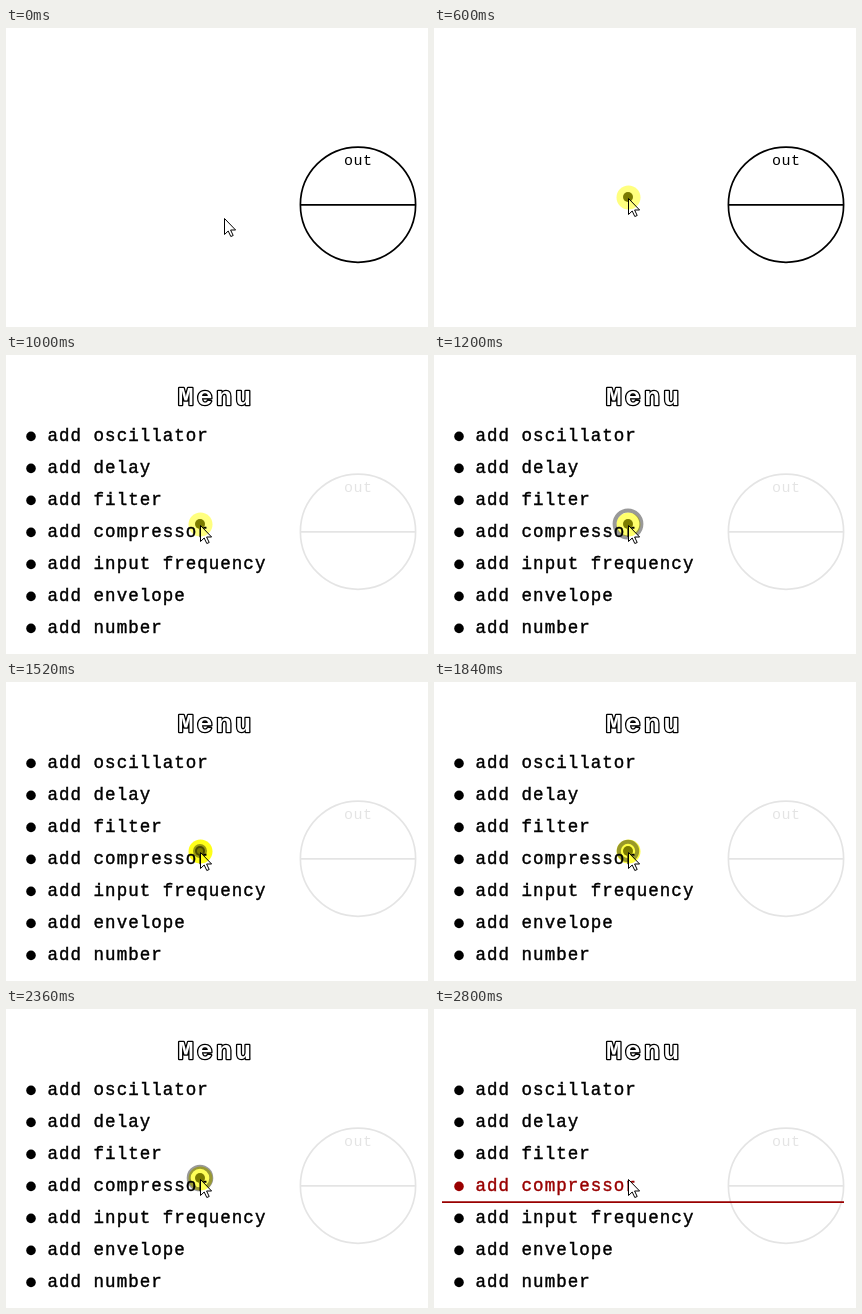
Recreate the animation shown at these times as an HTML page. Size 422 by 299 pixels, loop 3.78 s.

```html
<!DOCTYPE html>
<html lang="en">
<head>
<meta charset="utf-8">
<title>Hold to open menu</title>
<style>
  html, body { margin: 0; width: 100%; height: 100%; overflow: hidden; background: #fff; }
  svg { display: block; width: 422px; height: 299px; }
  text { font-family: "Courier New", "Liberation Mono", monospace; white-space: pre; }
  #out { fill: none; stroke: #000; stroke-width: 1.7; }
  #out text { font-size: 15px; letter-spacing: .6px; fill: #000; stroke: none; }
  .row text { font-size: 17.5px; letter-spacing: 1.02px; stroke: currentColor; stroke-width: .4; }
  .row { fill: currentColor; color: #000; }
  #title {
    font-size: 26px; font-weight: bold; letter-spacing: 3.6px;
    fill: #fff; stroke: #000; stroke-width: 2.6; paint-order: stroke; stroke-linejoin: round;
  }
  #line { stroke: #900; stroke-width: 1.8; }
  #ring { fill: none; stroke: #000; stroke-opacity: .4; stroke-width: 4; }
  #halo { mix-blend-mode: multiply; }
</style>
</head>
<body>
<svg viewBox="0 0 422 299">
  <g id="out">
    <circle cx="352" cy="176.7" r="57.6"/>
    <path d="M294.4 176.8H409.6"/>
    <text x="337.9" y="137">out</text>
  </g>
  <g id="menu">
    <text id="title" x="171.9" y="50.2">Menu</text>
  </g>
  <path id="line" d="M8 193.2H410"/>
  <g id="press">
    <circle id="dot" cx="194" cy="169" r="5" fill="#7a7a00"/>
    <circle id="ring" cx="194" cy="169" r="5"/>
  </g>
  <path id="cursor" d="M.5 .5V16.5L4.2 13L6.8 18.5L9.2 17.5L6.6 12H11.6Z" fill="#fff" stroke="#000"/>
  <circle id="halo" cx="194.5" cy="169.5" r="12" fill="#ff0"/>
</svg>
<script>
const LOOP = 3780, TICK = 40;
const $ = id => document.getElementById(id);
const clamp = v => Math.max(0, Math.min(1, v));
const ramp = (n, from, to) => clamp((n - from) / (to - from));
const mix = (a, b, p) => a + (b - a) * p;
const show = (el, on) => el.setAttribute('visibility', on ? 'visible' : 'hidden');

const labels = [
  'add oscillator', 'add delay', 'add filter', 'add compressor', 'add input frequency',
  'add envelope', 'add number', 'create module', 'reset view', 'close'
];

function make(tag, attrs, parent) {
  const el = document.createElementNS('http://www.w3.org/2000/svg', tag);
  for (const key in attrs) el.setAttribute(key, attrs[key]);
  return parent.appendChild(el);
}

const rows = labels.map((label, i) => {
  const y = 80 + 32 * i + (i > 6 ? 11 : 0);
  const row = make('g', { class: 'row' }, $('menu'));
  make('circle', { cx: 25, cy: y + 1.4, r: 4.8 }, row);
  make('text', { x: 41.5, y: y + 6 }, row).textContent = label;
  return row;
});

// n counts ticks of 40 ms
function draw(n) {
  const go = ramp(n, 2, 6), nudge = ramp(n, 10, 12);
  const x = mix(218, 198, go) - 4 * nudge, y = mix(190, 170, go);
  $('cursor').setAttribute('transform', `translate(${x} ${y})`);

  $('out').setAttribute('opacity', mix(1, .1, ramp(n, 15, 23)));

  // the menu unfolds downwards from a hinge above the stage
  const s = mix(.68, 1, ramp(n, 23, 25));
  show($('menu'), n >= 23);
  $('menu').setAttribute('transform', `translate(0 ${-45 * (1 - s)}) scale(1 ${s})`);

  // while held, rings spread from the dot and the halo pales with them
  const held = n >= 13 && n < 68, pulsing = held && n >= 26;
  const step = pulsing ? (n - 26) % 6 : 5;
  show($('dot'), held);
  show($('halo'), held);
  show($('ring'), pulsing);
  $('halo').setAttribute('fill-opacity', .9 - .08 * step);
  $('ring').setAttribute('r', 5 + 2.1 * step);

  const chosen = ramp(n, 68, 70);
  rows[3].style.color = `rgb(${Math.round(153 * chosen)}, 0, 0)`;
  $('line').setAttribute('opacity', chosen);
}

const start = performance.now();
function frame() {
  const t = (performance.now() - start) % LOOP;
  draw(Math.min(70, Math.floor(t / TICK)));
  requestAnimationFrame(frame);
}
frame();
</script>
</body>
</html>
```
